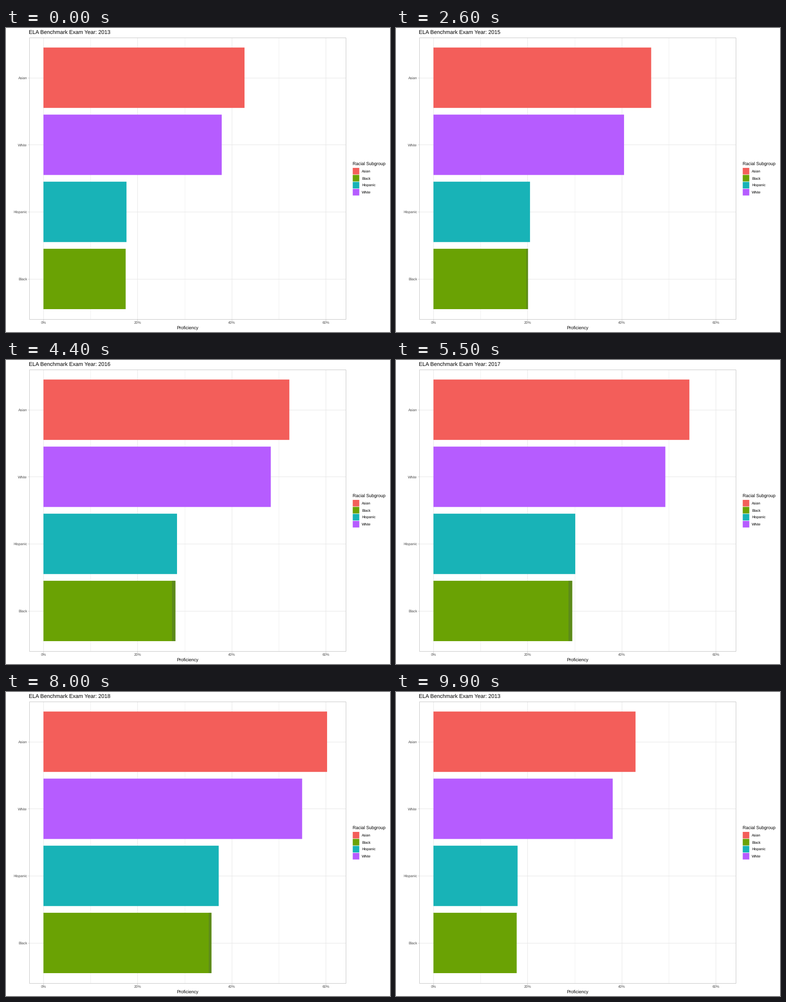
Animation, 842 px wide and 665 px high, one loop 10 s. Source, as a matplotlib script:

```python
import matplotlib.pyplot as plt
from matplotlib.animation import FuncAnimation
from matplotlib.patches import Rectangle

plt.rcParams["font.family"] = "Liberation Sans"
plt.rcParams["text.hinting"] = "none"

W, H, DPI = 842, 665, 100
LEFT, RIGHT, TOP, BOTTOM = 51, 745, 20.7, 637
ZERO, TEN_PCT = 82.1, 103.15
ROW = (BOTTOM - TOP) / 4.2
BAR_H = 0.9 * ROW
STEPS = 7

COLORS = {"Asian": "#F35E5A", "White": "#B65CFF",
          "Hispanic": "#18B3B7", "Black": "#6AA204"}
TRAIL = "#5C8A1A"

# Right edge of each bar in pixels, 2013 to 2019
EDGES = {
    "Asian": [523, 537.2, 569.8, 621.3, 653.4, 703, 714.2],
    "White": [473, 488.8, 505.2, 580.6, 595.2, 648, 662.4],
    "Hispanic": [264.2, 282.8, 298.9, 375, 401.4, 466, 470.4],
    "Black": [262.4, 282.8, 292.3, 371.4, 393.2, 450, 454.2],
}
# Frame at which each year begins to turn into the next
STARTS = [8, 23, 38, 52, 66, 80, 94]
SLOW_YEARS = (0, 5)

fig = plt.figure(figsize=(W / DPI, H / DPI), dpi=DPI, facecolor="white")
ax = fig.add_axes([0, 0, 1, 1])
ax.set_xlim(0, W)
ax.set_ylim(H, 0)
ax.axis("off")


def line(x0, y0, x1, y1, color, width=1.0, z=1):
    ax.plot([x0, x1], [y0, y1], color=color, lw=width * 72 / DPI,
            solid_capstyle="butt", zorder=z)


def rect(x, y, w, h, color, z=2):
    patch = Rectangle((x, y), w, h, facecolor=color, lw=0, zorder=z,
                      snap=False)
    return ax.add_patch(patch)


def label(x, y, text, px, color="black", align="left"):
    return ax.text(x, y, text, fontsize=px * 72 / DPI, color=color,
                   ha=align, va="baseline", zorder=5)


def row_center(i):
    return TOP + (0.6 + i) * ROW


def draw_panel():
    for i in range(7):
        x = ZERO + i * TEN_PCT
        major = i % 2 == 0
        line(x, TOP, x, BOTTOM, "#E6E6E6" if major else "#F0F0F0")
        if major:
            line(x, BOTTOM, x, BOTTOM + 2.6, "#CCCCCC")
            label(x, 647.4, f"{i * 10}%", 7.83, "#4D4D4D", "center")
    for i, name in enumerate(COLORS):
        y = row_center(i)
        line(LEFT, y, RIGHT, y, "#E6E6E6")
        line(LEFT - 2.6, y, LEFT, y, "#CCCCCC")
        label(46.3, y + 3, name, 7.83, "#4D4D4D", "right")
    ax.add_patch(Rectangle((LEFT, TOP), RIGHT - LEFT, BOTTOM - TOP, fill=False,
                           edgecolor="#C6C6C6", lw=72 / DPI, zorder=4))
    label((LEFT + RIGHT) / 2, 659.2, "Proficiency", 9.8, align="center")


def draw_legend():
    label(760, 299.8, "Racial Subgroup", 9.8)
    key = 15.35
    for i, name in enumerate(sorted(COLORS)):
        y = 305.5 + i * key
        rect(760.3, y + 0.5, key - 1, key - 1, COLORS[name])
        label(780, y + 10.6, name, 7.83)


def ease(t):
    return 4 * t ** 3 if t < 0.5 else 1 - 4 * (1 - t) ** 3


def edge(name, year, step):
    values = EDGES[name]
    a, b = values[year % 7], values[(year + 1) % 7]
    return a + (b - a) * ease(step / STEPS)


def phase(frame):
    """Year being left and the step (1 to 7) on the way to the next."""
    year = sum(frame >= s for s in STARTS) - 1
    if year < 0:
        return 6, STEPS
    step = min(frame - STARTS[year] + 1, STEPS)
    if year in SLOW_YEARS:
        step = max(step, 2)
    return year, step


def trail_start(year, step):
    """Left side of the dark strip at the growing end of the last bar."""
    if step <= 2:
        return edge("Black", year - 1, 5)
    return edge("Black", year, min(step - 1, 5))


draw_panel()
draw_legend()
title = label(50.3, 13.1, "", 11.92)
bars = {name: rect(ZERO, row_center(i) - BAR_H / 2, 0, BAR_H, color)
        for i, (name, color) in enumerate(COLORS.items())}
trail = rect(ZERO, row_center(3) - BAR_H / 2, 0, BAR_H, TRAIL, z=3)


def update(frame):
    year, step = phase(frame)
    for name, bar in bars.items():
        bar.set_width(edge(name, year, step) - ZERO)
    start, end = trail_start(year, step), edge("Black", year, step)
    trail.set_x(start)
    trail.set_width(max(end - start, 0))
    trail.set_visible(end > start)
    shown = (year + (step / STEPS > 0.5)) % 7
    title.set_text(f"ELA Benchmark Exam Year: {2013 + shown}")
    return [*bars.values(), trail, title]


anim = FuncAnimation(fig, update, frames=100, interval=100,
                     repeat=True, repeat_delay=0, blit=False)
plt.show()
```
